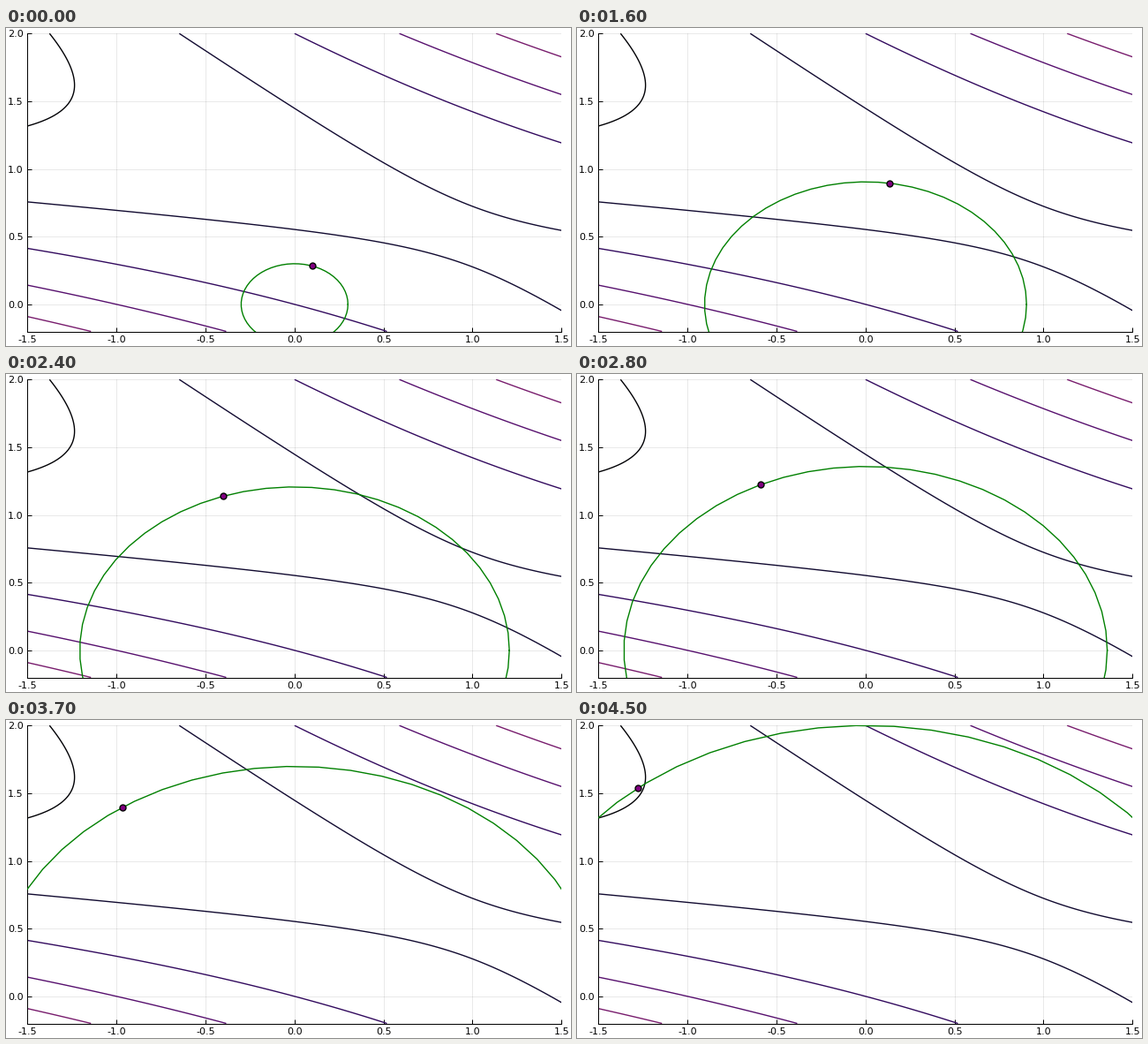
Recreate the animation shown at these times as a matplotlib script. Size 640 px wide and 360 px high, loop 4.55 s.

```python
import numpy as np
import matplotlib
import matplotlib.pyplot as plt
from matplotlib.animation import FuncAnimation

W, H, DPI = 640, 360, 100
FRAMES, INTERVAL = 91, 50
LEFT, RIGHT, TOP, BOTTOM = 24.4, 629.3, 6.2, 343.5

plt.rcParams["font.family"] = "DejaVu Sans"
plt.rcParams["axes.unicode_minus"] = False

# Quadratic model g.x + x'Bx / 2 with an indefinite Hessian
B = np.array([[0.2, 1.0], [1.0, 2.0]])
g = np.array([-0.7, -2.0])


def model(x, y):
    return 0.1 * x**2 + x * y + y**2 - 0.7 * x - 2 * y


def to_boundary(p, d, radius):
    """Walk from p along d until the circle is reached."""
    a, b, c = d @ d, p @ d, p @ p - radius**2
    return p + (-b + np.sqrt(b * b - a * c)) / a * d


def steihaug(radius):
    """Truncated conjugate gradient step inside the trust region."""
    p, r, d = np.zeros(2), g, -g
    for _ in range(2):
        curvature = d @ B @ d
        if curvature <= 0:
            return to_boundary(p, d, radius)
        alpha = (r @ r) / curvature
        q = p + alpha * d
        if np.hypot(*q) >= radius:
            return to_boundary(p, d, radius)
        r_next = r + alpha * (B @ d)
        d = -r_next + (r_next @ r_next) / (r @ r) * d
        p, r = q, r_next
    return p


fig = plt.figure(figsize=(W / DPI, H / DPI), dpi=DPI, facecolor="white")
ax = fig.add_axes([LEFT / W, 1 - BOTTOM / H, (RIGHT - LEFT) / W, (BOTTOM - TOP) / H])
ax.set(xlim=(-1.5, 1.5), ylim=(-0.2, 2))
ax.set_xticks(np.arange(-1.5, 1.6, 0.5))
ax.set_yticks(np.arange(0, 2.1, 0.5))
ax.xaxis.set_major_formatter("{x:.1f}")
ax.yaxis.set_major_formatter("{x:.1f}")
ax.spines[["top", "right"]].set_visible(False)
ax.spines[["left", "bottom"]].set_linewidth(0.72)
ax.tick_params(direction="in", length=3.4, width=0.72, labelsize=8, pad=3.3)
ax.set_axisbelow(True)
ax.grid(color="black", alpha=0.1, linewidth=0.6)

X, Y = np.meshgrid(np.linspace(-1.5, 1.5, 301), np.linspace(-0.2, 2, 221))
levels = 0.8 * np.arange(-2, 3)
shades = matplotlib.colormaps["inferno"](np.arange(5) / 12)
ax.contour(X, Y, model(X, Y), levels=levels, colors=shades,
           linestyles="solid", linewidths=1)

angle = np.linspace(0, 2 * np.pi, 60)
circle, = ax.plot([], [], color="green", lw=1, zorder=4)
dot, = ax.plot([], [], "o", ms=5, mfc="purple", mec="black", mew=1, zorder=5)


def draw(i):
    radius = 0.3 + 1.7 * i / (FRAMES - 1)
    circle.set_data(radius * np.cos(angle), radius * np.sin(angle))
    x, y = steihaug(radius)
    dot.set_data([x], [y])
    return circle, dot


anim = FuncAnimation(fig, draw, frames=FRAMES, interval=INTERVAL,
                     repeat=True, repeat_delay=0)
plt.show()
```
